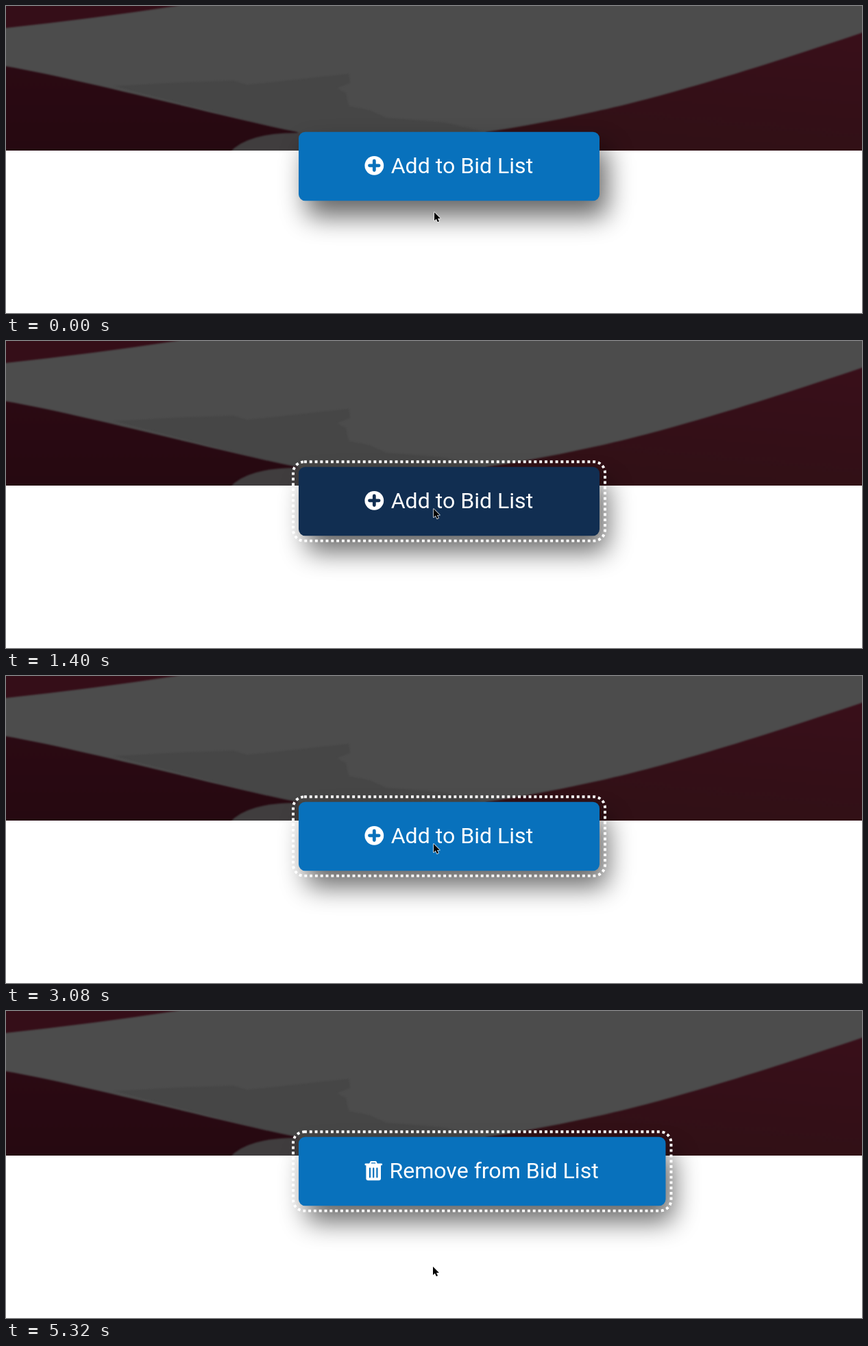
An HTML page for the animation above (5600 ms loop, 1249 by 448 pixels).

```html
<!DOCTYPE html>
<html lang="en">
<head>
<meta charset="utf-8">
<title>Bid list button</title>
<style>
  html, body { margin: 0; width: 100%; height: 100%; overflow: hidden; background: #fff; }
  svg { display: block; }
  text { font: 32.1px Roboto, sans-serif; fill: #fff; }
  #shadow { filter: blur(19px); opacity: .6; }
  #photo path { filter: blur(1.2px); }
</style>
</head>
<body>
<svg width="1249" height="448" viewBox="0 0 1249 448">
  <defs>
    <clipPath id="banner"><rect width="1249" height="211"/></clipPath>
    <linearGradient id="left" x2="0" y2="1"><stop stop-color="#2b0a13"/><stop offset="1" stop-color="#260911"/></linearGradient>
    <linearGradient id="right" x1="1" x2=".7" y2="1"><stop stop-color="#390f1a"/><stop offset="1" stop-color="#311016"/></linearGradient>
  </defs>

  <g id="photo" clip-path="url(#banner)">
    <rect width="1249" height="212" fill="#4c4c4c"/>
    <path fill="#464646" d="M158 117 245 112 332 109 352 115 400 110 500 99 502 112 483 120 496 127 500 146 530 152 555 163 640 170 700 184 425 186Z"/>
    <path fill="#350e18" d="M-4-4H265L248 0Q130 18 0 32L-4 33Z"/>
    <path fill="url(#left)" d="M-4 87 0 88C110 107 300 158 425 184L440 216H-4Z"/>
    <path fill="#403d3e" d="M326 214Q352 184 430 185V214Z"/>
    <path fill="url(#right)" d="M1253 37 1249 39C1080 96 950 135 860 154Q780 172 700 184V216H1253Z"/>
  </g>

  <rect id="shadow" x="438" y="207" height="100" rx="10"/>
  <rect id="button" x="427" rx="9.5"/>
  <rect id="focus" x="419" rx="16" fill="none" stroke="#fff" stroke-width="3.9" stroke-dasharray="3.9"/>

  <g id="plus">
    <circle cx="537.3" cy="232.8" r="13.9" fill="#fff"/>
    <path id="cross" d="M530.5 232.8h13.6M537.3 226v13.6" stroke-width="4.8" stroke-linecap="round"/>
  </g>
  <g id="spinner" fill="none" stroke="#fff" stroke-width="5.4">
    <circle r="12.9" opacity=".25"/>
    <path d="M9.12-9.12A12.9 12.9 0 0 1 9.12 9.12"/>
  </g>
  <g id="trash" fill="#fff">
    <path d="M531 223.500 532.500 220.200H539.500L541 223.500" fill="none" stroke="#fff" stroke-width="2.200" stroke-linejoin="round"/>
    <rect x="523.500" y="222.500" width="25.500" height="2.800" rx="1"/>
    <path d="M525.400 225H547V244.200Q547 247.200 544 247.200H528.400Q525.400 247.200 525.400 244.200Z"/>
    <path id="slots" d="M531 229.500V242.500M536.200 229.500V242.500M541.400 229.500V242.500" stroke-width="2.200" stroke-linecap="round"/>
  </g>
  <text id="label"></text>

  <g id="cursor" stroke-linejoin="round">
    <path id="arrow" d="M0 0V12.2L2.8 9.7 4.9 14.3 7 13.3 5 8.9H8.9Z" stroke="#fff" stroke-width="1.4" paint-order="stroke"/>
    <path id="hand" fill="#fff" stroke="#000" d="M-.9 8.8V2Q-.9.7.3.7T1.6 2V5.800Q2 4.400 3 4.800 3.800 4.300 4 5.700 5.600 5 6 6.500 7.600 6.200 7.600 7.700V10.500L6.500 13V15H-.3V13.300L-3.700 9.300Q-4.500 8-3.300 7.300-2.300 7-.9 8.800Z"/>
  </g>
</svg>
<script>
const $ = id => document.getElementById(id);
const set = (id, attrs) => {
  for (const name in attrs) $(id).setAttribute(name, attrs[name]);
};
const show = (id, on) => set(id, { visibility: on ? "visible" : "hidden" });

const LOOP = 5600, STEP = 70;
const PRESS = 1120, RELEASE = 1330, LOAD = 1470, LOADED = 3080, REMOVE = 3850, REHOVER = 3920;
const BLUE = "#0871bc", HOVER = "#205493", ACTIVE = "#112e51";

const ease = (t, start, end) => {
  const u = Math.min(1, Math.max(0, (t - start) / (end - start)));
  return u * u * (3 - 2 * u);
};

function draw(t) {
  const focused = t >= PRESS;
  const pressed = focused && t < LOAD;
  const loading = t >= LOAD && t < LOADED;
  const remove = t >= REMOVE;
  const arrive = ease(t, 0, 525), leave = ease(t, 4690, 5320);
  const y = 301 - 56 * arrive + 128 * leave;
  const over = y < 284;
  const pointing = over && (t < RELEASE || t >= REHOVER);

  const width = remove ? 535.5 : loading ? 442 : 439;
  const top = loading ? 182.4 : 183.7;
  const color = pressed ? ACTIVE : pointing ? HOVER : BLUE;

  set("shadow", { width });
  set("button", { y: top, width, height: 284.2 - top, fill: color });
  set("focus", { y: top - 7.4, width: width + 16, height: 299 - top });
  show("focus", focused);

  show("plus", !loading && !remove);
  show("spinner", loading);
  show("trash", remove);
  set("cross", { stroke: color });
  set("slots", { stroke: color });
  set("spinner", { transform: `translate(538.3 234) rotate(${128 + (t - 2100) / 840 * 360})` });

  set("label", { x: remove ? 559.4 : loading ? 564.3 : 561.7, y: loading ? 245.1 : 244.4 });
  $("label").textContent = (remove ? "Remove from" : "Add to") + " Bid List";

  set("cursor", { transform: `translate(${625 - arrive - leave} ${y})` });
  show("arrow", !pointing);
  show("hand", pointing);
}

const begin = performance.now();
function tick() {
  const t = (performance.now() - begin) % LOOP;
  draw(Math.floor(t / STEP) * STEP);
  requestAnimationFrame(tick);
}
tick();
</script>
</body>
</html>
```
